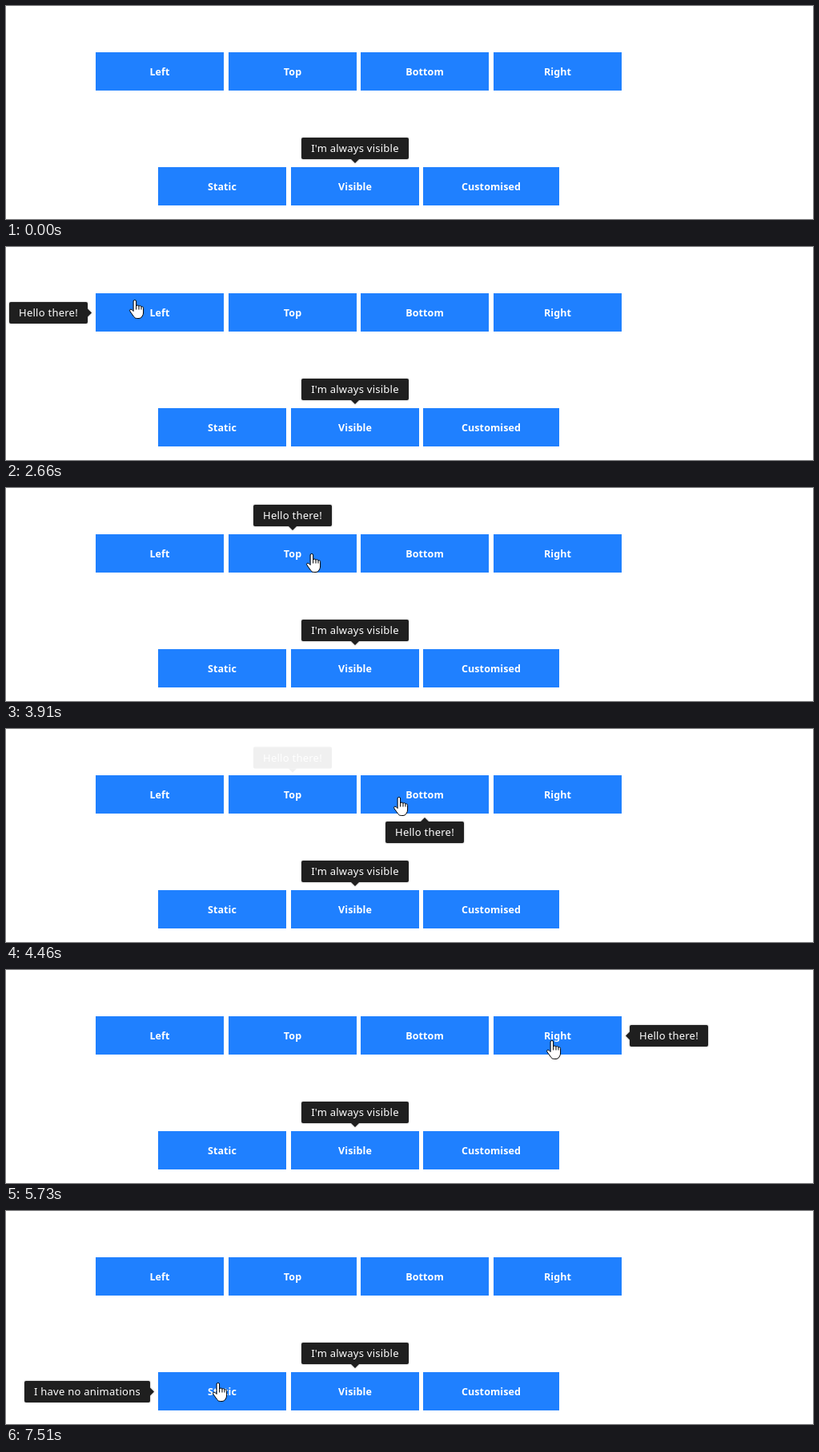
Recreate the animation shown at these times as an HTML page. Size 1008 by 267 pixels, loop 8 s.

```html
<!DOCTYPE html>
<html lang="en">
<head>
<meta charset="utf-8">
<title>Tooltips</title>
<style>
  html, body { margin: 0; width: 100%; height: 100%; overflow: hidden; background: #fff; }
  svg { display: block; width: 1008px; height: 267px; }
  text { fill: #fff; text-anchor: middle; font: 13px "Noto Sans", "DejaVu Sans", sans-serif; letter-spacing: .25px; }
  .button rect { fill: #1f80ff; }
  .button text { font-size: 12.5px; font-weight: 700; letter-spacing: .1px; }
  .tip { fill: #1f1f1f; filter: drop-shadow(0 0 1px #0005); }
  .cursor { fill: #fff; stroke: #000; stroke-linejoin: round; }
</style>
</head>
<body>
<svg id="stage" viewBox="0 0 1008 267"></svg>
<script>
const stage = document.getElementById('stage');
const LOOP = 8000, TICK = 77.95, START = 1172; // the pointer is sampled once per tick
const FADE_IN = 2, FADE_OUT = 3.2, LAST = 81;  // in ticks
const HEIGHT = 48, PITCH = 165.6;

function add(parent, tag, attrs, text = '') {
  const el = document.createElementNS('http://www.w3.org/2000/svg', tag);
  for (const key in attrs) el.setAttribute(key, attrs[key]);
  el.textContent = text;
  return parent.appendChild(el);
}
const move = (el, x, y) => el.setAttribute('transform', `translate(${x} ${y})`);

function makeRow(left, y, labels) {
  return labels.map((label, i) => {
    const x = Math.round(left + i * PITCH), width = label === 'Customised' ? 170 : 160;
    const g = add(stage, 'g', { class: 'button' });
    add(g, 'rect', { x, y, width, height: HEIGHT });
    add(g, 'text', { x: x + width / 2, y: y + 29 }, label);
    return { x, y, width };
  });
}
const [left, top_, bottom, right] = makeRow(112, 58, ['Left', 'Top', 'Bottom', 'Right']);
const [fixed, visible, custom] = makeRow(190, 202, ['Static', 'Visible', 'Customised']);
const buttons = [left, top_, bottom, right, fixed, visible, custom];
const isOver = (b, [x, y]) => x >= b.x && x < b.x + b.width && y >= b.y && y < b.y + HEIGHT;

// pointer stops: tick, x, y, and the power that eases the way there
const stops = [
  [0, 13, 4], [1, -40, -60], [3, 40, 14], [8, 159, 66],
  [18, 159, 66], [26, 303, 74, 2], [35, 382, 82], [44, 522, 86],
  [45, 522, 86], [53, 602, 85, 1.3], [56, 682, 88],
  [64, 682, 88], [68, 537, 151], [75, 327, 140], [LAST, 265, 215]
];
function pointer(tick) {
  if (tick < 0) return [-40, -60];
  const i = stops.findIndex(s => s[0] > tick);
  if (i < 0) return stops.at(-1).slice(1, 3);
  const [t0, x0, y0] = stops[i - 1], [t1, x1, y1, power = 1] = stops[i];
  const k = ((tick - t0) / (t1 - t0)) ** power;
  return [Math.round(x0 + (x1 - x0) * k), Math.round(y0 + (y1 - y0) * k)];
}

// (dx, dy) points from the button out to its tip
function makeTip(button, text, width, dx, dy, mode) {
  const cx = button.x + button.width / 2 + dx * (button.width / 2 + 10 + width / 2);
  const x = cx - width / 2;
  const y = Math.round(button.y + HEIGHT / 2 + dy * (HEIGHT / 2 + 23.5) - 13.5);
  const ex = cx - dx * width / 2, ey = y + 13.5 - dy * 13.5;
  const g = add(stage, 'g', {});
  const body = add(g, 'g', { class: 'tip' });
  add(body, 'rect', { x, y, width, height: 27, rx: 2 });
  add(body, 'path', {
    d: `M${ex + dy * 5} ${ey + dx * 5}L${ex - dx * 5} ${ey - dy * 5}L${ex - dy * 5} ${ey - dx * 5}Z`
  });
  add(g, 'text', { x: cx, y: y + 18 }, text);

  let enter = Infinity, leave = Infinity;
  for (let t = LAST; t >= 0; t--) {
    if (!isOver(button, pointer(t))) continue;
    enter = t;
    if (leave === Infinity && t < LAST) leave = t + 1;
  }
  return { g, dx, dy, enter, leave, mode };
}
const hello = 'Hello there!';
const tips = [
  makeTip(left, hello, 98, -1, 0),
  makeTip(top_, hello, 98, 0, -1),
  makeTip(bottom, hello, 98, 0, 1),
  makeTip(right, hello, 98, 1, 0),
  makeTip(fixed, 'I have no animations', 157, -1, 0, 'instant'),
  makeTip(visible, "I'm always visible", 134, 0, -1, 'always')
];
const clamp = v => Math.min(1, Math.max(0, v));
function opacity({ enter, leave, mode }, tick) {
  if (mode === 'always') return 1;
  if (mode === 'instant') return +(tick >= enter);
  return clamp((tick - enter) / FADE_IN) * (1 - clamp((tick - leave) / FADE_OUT));
}

const arrow = add(stage, 'path', {
  class: 'cursor', d: 'M.5 .5V16.5L4.2 13L6.6 18.6L9 17.6L6.7 12.2H11.7Z'
});
const hand = add(stage, 'path', {
  class: 'cursor',
  d: 'M-1.9 14.5V2Q-1.9 .5-.2 .5Q1.6 .5 1.6 2V8.5Q1.6 7 3.2 7Q5 7 5 8.6Q5 7.6 6.6 7.6Q8 7.7 8 9.4' +
     'Q8.4 8.6 9.4 8.8Q10.6 9 10.6 10.6V16Q10.6 19 9 21Q8 23.5 5 23.5H2.5Q0 23.5-1.2 21.5' +
     'L-6 14.8Q-7 12.8-5.6 12.2Q-4 11.6-1.9 14.5ZM1.6 8.5V12.5M5 8.6V12.5M8 9.4V12.5'
});

function draw(now) {
  const tick = Math.floor((now % LOOP - START) / TICK);
  for (const tip of tips) {
    const o = opacity(tip, tick), slide = 1.6 * (o - 1);
    tip.g.setAttribute('opacity', o);
    move(tip.g, tip.dx * slide, tip.dy * slide);
  }
  const at = pointer(tick);
  const over = buttons.some(b => isOver(b, at));
  arrow.style.display = over ? 'none' : '';
  hand.style.display = over ? '' : 'none';
  move(over ? hand : arrow, ...at);
  requestAnimationFrame(draw);
}
draw(performance.now());
</script>
</body>
</html>
```
